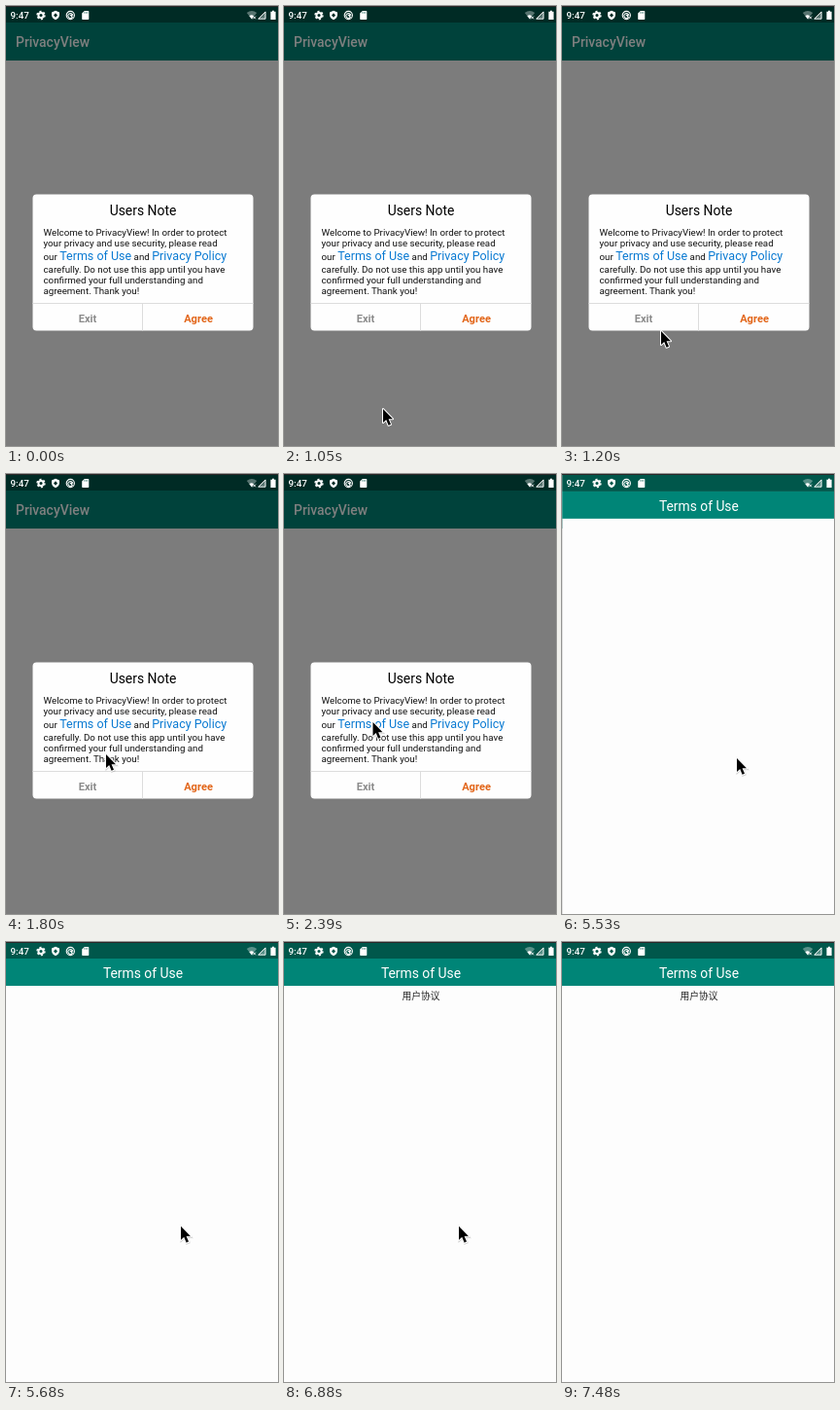
Animation of 280x452 px, one loop 8000 ms. Source, as an HTML page:

```html
<!DOCTYPE html>
<html lang="en">
<head>
<meta charset="utf-8">
<title>Users Note</title>
<style>
  html, body { margin: 0; width: 100%; height: 100%; overflow: hidden; background: #fdfdfd; }
  svg { display: block; width: 100vw; height: 100vh; font: 9.75px Roboto, sans-serif; }
  .center { text-anchor: middle; }
  .heading { font-size: 13.9px; }
  .link { font-size: 12.5px; fill: #0a7ad2; }
  .button { font-size: 11.1px; font-weight: 700; }
  .medium { font-weight: 500; }
</style>
</head>
<body>
<svg viewBox="0 0 280 452">
  <g id="home">
    <rect width="280" height="452" fill="#fafafa"/>
    <rect width="280" height="17" fill="#00574b"/>
    <rect y="17" width="280" height="39" fill="#008577"/>
    <text class="heading medium" x="10" y="42.3" fill="#fff">PrivacyView</text>
    <rect id="dim" width="280" height="452"/>
  </g>

  <g id="dialog">
    <rect x="27.5" y="193.5" width="227" height="140" rx="4" fill="#fefefe"/>
    <text class="heading center" x="141" y="215">Users Note</text>
    <g fill="#111">
      <text x="38.5" y="236">Welcome to PrivacyView! In order to protect</text>
      <text x="38.5" y="247.4">your privacy and use security, please read</text>
      <text x="38.5" y="261.3">our <tspan class="link">Terms of Use</tspan> and <tspan class="link">Privacy Policy</tspan></text>
      <text x="38.5" y="273.5">carefully. Do not use this app until you have</text>
      <text x="38.5" y="285">confirmed your full understanding and</text>
      <text x="38.5" y="296.4">agreement. Thank you!</text>
    </g>
    <path d="M27.5 305.5H254.5M140.5 305.5V333.5" stroke="#dcdcdc"/>
    <text class="button center" x="84" y="324.5" fill="#8c8c8c">Exit</text>
    <text class="button center" x="198" y="324.5" fill="#e2661a">Agree</text>
  </g>

  <g id="terms">
    <rect width="286" height="470" fill="#fdfdfd"/>
    <rect width="286" height="17" fill="#00574b"/>
    <rect y="17" width="286" height="28" fill="#008577"/>
    <text class="heading center" x="141" y="37" fill="#fff">Terms of Use</text>
    <text id="agreement" class="center" lang="zh" x="141" y="59.4" fill="#222" style="font-family:'Noto Sans CJK SC','Noto Sans CJK',sans-serif">用户协议</text>
  </g>

  <g id="status" fill="#fff">
    <rect width="280" height="1" fill="#2b2728"/>
    <text class="medium" x="4.5" y="13">9:47</text>
    <g fill="none" stroke="#fff">
      <circle cx="36" cy="9.5" r="2.6" stroke-width="2"/>
      <circle cx="36" cy="9.5" r="4" stroke-width="1.4" stroke-dasharray="2.1 2.09"/>
      <circle cx="66.3" cy="9.5" r="4.1" stroke-width="1.1"/>
      <path d="M68.4 11.4A2.5 2.5 0 1 1 68.7 9.2H66.3L68.6 11.7" stroke-width="1.1"/>
    </g>
    <path fill-rule="evenodd" d="M51 4.8L55 6.4V9.3Q54.8 12.6 51 14.2Q47.2 12.6 47 9.3V6.4ZM51 7.3L49 9.5L51 11.7L53 9.5Z"/>
    <path d="M80.8 5H84.5Q85.3 5 85.3 5.8V13.2Q85.3 14 84.5 14H79Q78.2 14 78.2 13.2V7.6Z"/>
    <path d="M80.8 6V7.8M82.3 6V7.8M83.8 6V7.8" stroke="#00574b" stroke-width=".5"/>
    <path opacity=".35" d="M247.8 7Q253 3.2 258.2 7L253 13.6Z"/>
    <path d="M250.4 10.2Q253 8.4 255 10.3L253 13.6Z"/>
    <path d="M254.3 10.6L257 13.3M257 10.6L254.3 13.3" stroke="#fff" stroke-width=".9"/>
    <path opacity=".35" d="M267.5 5V13.6H258.9Z"/>
    <path fill="none" stroke="#fff" stroke-width=".9" d="M267 6V13.2H259.8Z"/>
    <path d="M274 4.8H276V5.7H277.6V14H272.4V5.7H274Z"/>
  </g>

  <g id="cursor">
    <path d="M0 0V14L3.2 11L5.6 16.8L8 15.8L5.6 10.2H10Z" transform="translate(.5 1)" fill="#777" stroke="#777" stroke-width="2" opacity=".3"/>
    <path d="M0 0V14L3.2 11L5.6 16.8L8 15.8L5.6 10.2H10Z" stroke="#fff" stroke-width="2" stroke-linejoin="round" paint-order="stroke"/>
  </g>
</svg>
<script>
  const LOOP = 8000, OPEN = 5380, TEXT_LOADED = 6880;

  // Pointer steps: start time, x, y. A step without a position hides the pointer.
  const pointer = [
    [0], [1050, 102, 414], [1200, 102, 334], [1650, 107, 318], [1800, 103, 288],
    [1940, 99, 276], [2090, 94, 264], [2240, 93.5, 259], [2390, 91.5, 255],
    [5380, 110.5, 266.5], [5530, 180, 292], [7330, 126.5, 379], [7480]
  ];
  // Opening page: start time, x, y, scale.
  const opening = [[OPEN, 2, 5.3, .986], [5530, .3, 1, .997], [5680, 0, 0, 1]];

  const el = id => document.getElementById(id);
  const show = (id, visible) => el(id).setAttribute('visibility', visible ? 'visible' : 'hidden');
  const place = (id, x, y, scale = 1) =>
    el(id).setAttribute('transform', `translate(${x} ${y}) scale(${scale})`);
  const current = (steps, t) => steps.findLast(([start]) => t >= start) || [];

  function draw(t) {
    const open = t >= OPEN;
    show('dialog', !open);
    show('terms', open);
    show('agreement', t >= TEXT_LOADED);
    el('dim').setAttribute('opacity', open ? .33 : .5);
    if (open) place('terms', ...current(opening, t).slice(1));

    const [, x, y] = current(pointer, t);
    show('cursor', x !== undefined);
    if (x !== undefined) place('cursor', x, y);
  }

  const begin = performance.now();
  function tick() {
    draw((performance.now() - begin) % LOOP);
    requestAnimationFrame(tick);
  }
  tick();
</script>
</body>
</html>
```
